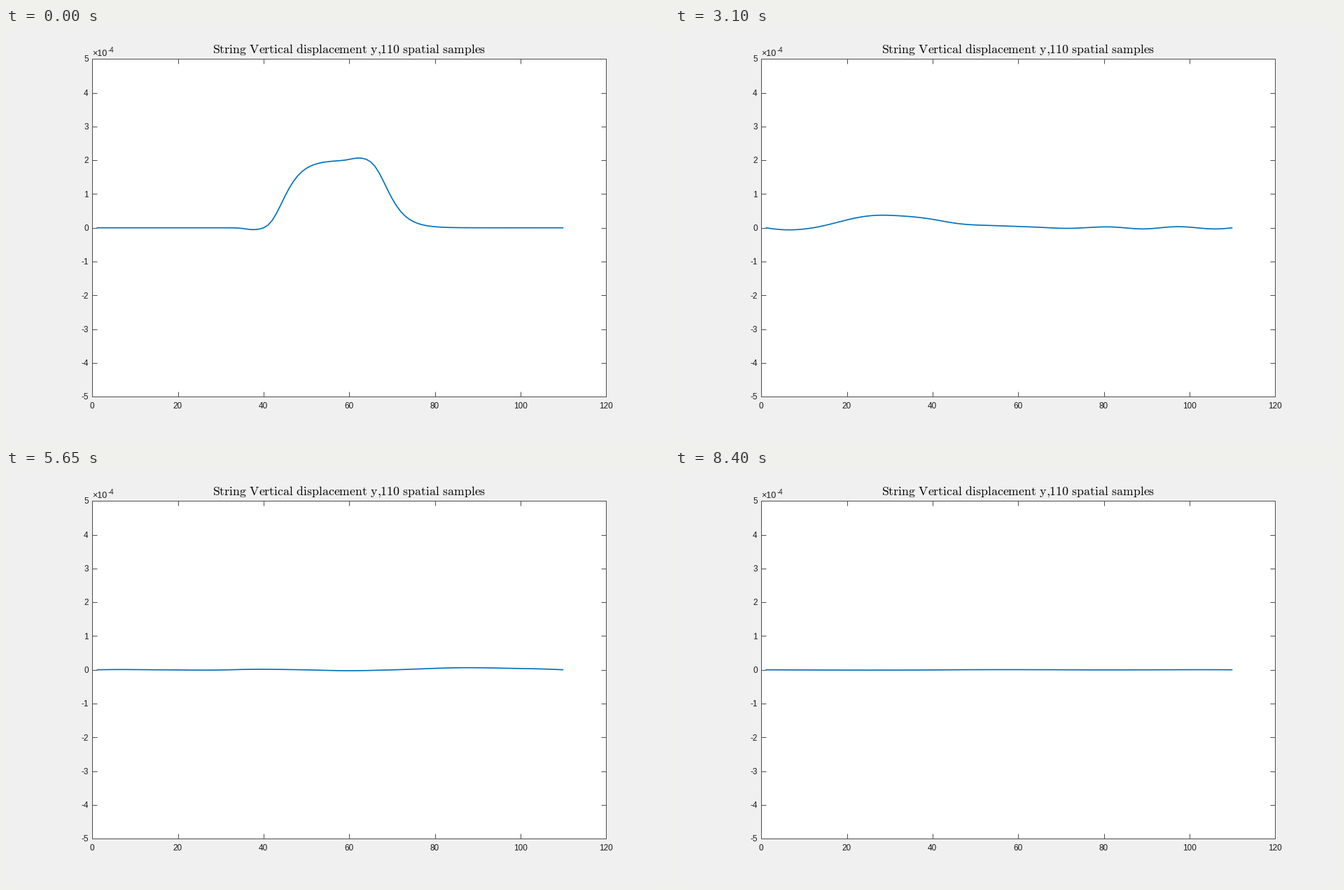
A matplotlib script that plays this animation: 947 by 592 pixels, repeating every 8.45 s.

```python
import numpy as np
import matplotlib.pyplot as plt
from matplotlib.animation import FuncAnimation

W, H, DPI = 947, 592, 100
LEFT, RIGHT, TOP, BOTTOM = 123.4, 857.4, 44.2, 527.2
INK, FRAME = "#1a1a1a", "#4d4d4d"
N = 110                 # spatial samples
L = N - 1               # string length in segments
HOLD = 10               # ticks spent on the opening pose
TICKS = 169

plt.rcParams["font.family"] = "Liberation Sans"
plt.rcParams["mathtext.fontset"] = "cm"


def pt(px):
    return px * 72 / DPI


def edge(x, centre, width=2.8):
    """Smooth step with a sharp onset and a slow approach to one."""
    return np.exp(-np.exp((centre - x) / width))


def bump(x, centre, width=1.8):
    return np.exp(-((x - centre) / width) ** 2 / 2)


# Opening pulse, displacement in units of 1e-4
sample = np.arange(1, N + 1)
pulse = (2 * (edge(sample, 44.2) - edge(sample, 68.4))
         - 0.055 * bump(sample, 37.6) + 0.07 * bump(sample, 62.2))

# The pulse runs to the right as a sum of modes of a stiff, damped grid string
STIFF = 0.0683
PERIODS = 3.2999        # string periods per drawn step
mode = np.arange(1, L)
k = mode * np.pi / L
pos = sample - 1
amp = np.exp(-1j * np.outer(k, pos)) @ pulse / L
shape = np.sin(np.outer(pos, k))
half = np.sin(k / 2)
omega = PERIODS * 2 * L * 2 * half * np.sqrt(1 + 4 * STIFF * half ** 2)
decay = 0.0316 + 5.4e-5 * mode ** 2


def displacement(step):
    moved = amp * np.exp(-(decay + 1j * omega) * step)
    return shape @ (-2 * moved.imag)


fig = plt.figure(figsize=(W / DPI, H / DPI), dpi=DPI, facecolor="#f0f0f0")
ax = fig.add_axes([LEFT / W, 1 - BOTTOM / H,
                   (RIGHT - LEFT) / W, (BOTTOM - TOP) / H])
ax.set(xlim=(0, 120), ylim=(-5, 5),
       xticks=range(0, 121, 20), yticks=range(-5, 6))
ax.tick_params(direction="in", top=True, right=True, length=pt(7.4),
               width=pt(1), color=FRAME, labelbottom=False, labelleft=False)
for spine in ax.spines.values():
    spine.set(linewidth=pt(1), edgecolor=FRAME)


def label(x, y, text, size=11.7, ha="center", color=INK):
    fig.text(x / W, 1 - y / H, text, fontsize=pt(size), color=color,
             ha=ha, va="baseline")


for v in range(0, 121, 20):
    label(LEFT + v / 120 * (RIGHT - LEFT) - 0.4, 543.8, str(v))
for v in range(-5, 6):
    label(117.8, BOTTOM - (v + 5) / 10 * (BOTTOM - TOP) + 4.2, str(v),
          ha="right")
label(123.6, 40.3, "×10", 12.5, "left")
label(145.6, 34.6, "-4", 9.6, "left")
title = "String Vertical displacement y{,}110 spatial samples"
label(490.4, 36.2, r"$\mathrm{%s}$" % title.replace(" ", r"\ "), 17.8,
      color="black")

string, = ax.plot(sample, pulse, color="#0072BD", linewidth=pt(1.7),
                  solid_capstyle="butt")


def draw(tick):
    string.set_ydata(displacement(max(0, tick - HOLD + 1)))
    return string,


anim = FuncAnimation(fig, draw, frames=TICKS, interval=50, repeat=True,
                     repeat_delay=0)
plt.show()
```
